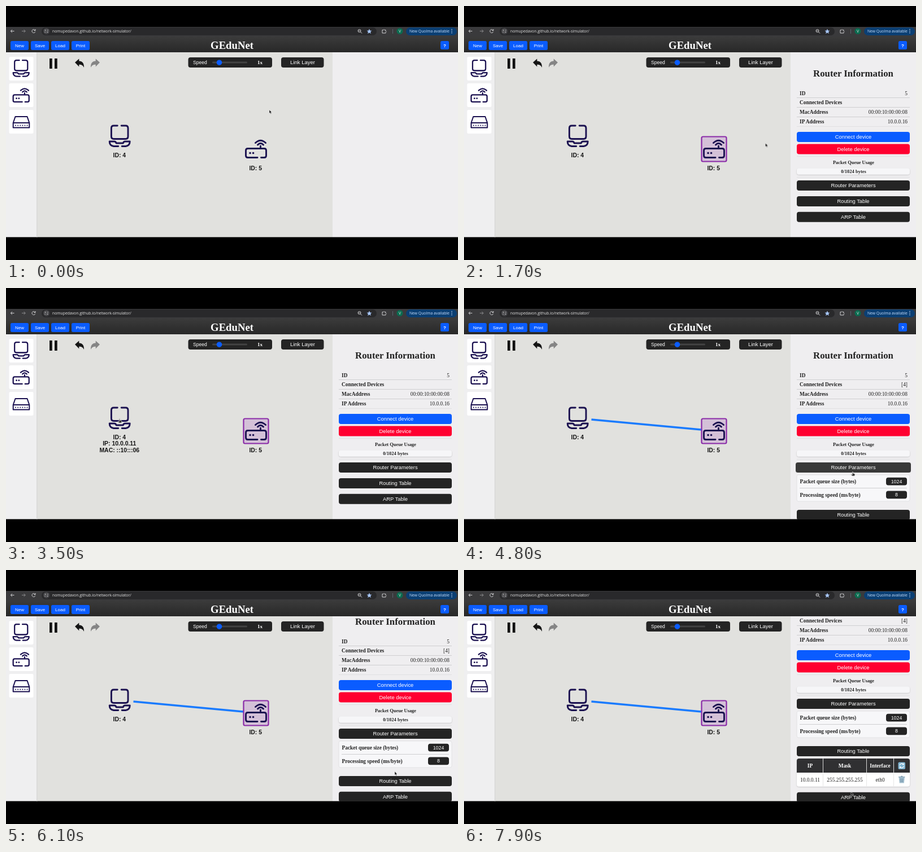
An HTML page that plays this animation: 800 px wide and 450 px high, repeating every 8000 ms.

```html
<!DOCTYPE html>
<html lang="en">
<head>
<meta charset="utf-8">
<title>Network simulator</title>
<style>
  html, body { margin: 0; width: 100%; height: 100%; overflow: hidden; background: #000; }
  svg { display: block; width: 800px; height: 450px; }
  text { font: 9.4px "Liberation Sans", Arial, sans-serif; fill: #fff; text-anchor: middle; }
  .ui { font: 6.8px "Open Sans", "Noto Sans", sans-serif; fill: #e3e3e3; text-anchor: start; }
  .small { font-size: 8px; }
  .serif { font-family: "Liberation Serif", serif; fill: #222; }
  .bold { font-weight: bold; }
  .start { text-anchor: start; }
  .end { text-anchor: end; }
  .white { fill: #fff; }
  .label text { font-size: 10.45px; font-weight: bold; fill: #151515; }
  .blue { fill: #0a5cff; }
  .dark { fill: #242424; }
  .red { fill: #ff0030; }
  .line { stroke: #cfcfd1; stroke-width: 1; }
  .icon { fill: none; stroke: #1b1150; stroke-width: 2.9; stroke-linecap: round; stroke-linejoin: round; }
  .tools { fill: none; stroke: #d0d0d2; stroke-width: 1; }

  .anim { animation: 8s infinite both; }
  .step { animation-timing-function: step-end; }
  .linear { animation-timing-function: linear; }
  .cursor { animation-name: cursor; animation-timing-function: ease-in-out; }
  .arrow { animation-name: arrow; }
  .hand { animation-name: hand; }
  .selected { animation-name: selected; }
  .linked { animation-name: linked; }
  .router-info { animation-name: router-info; }
  .host-info { animation-name: host-info; }
  .scroll { animation-name: scroll; }
  .params { animation-name: params; }
  .lower { animation-name: lower; }
  .routes { animation-name: routes; }
  .arp { animation-name: arp; }
  .connect { animation-name: connect; }
  .params-button { animation-name: params-button; }
  .routes-button { animation-name: routes-button; }

  @keyframes cursor {
    0%, 5% { transform: translate(466px, 184px); }
    12.5%, 16.25% { transform: translate(446px, 250px); }
    27.5%, 28.75% { transform: translate(661px, 233px); }
    38.75%, 47.5% { transform: translate(201px, 231px); }
    58.75%, 70% { transform: translate(688px, 325px); }
    80%, 93.75% { transform: translate(688px, 370px); }
    98.6%, 100% { transform: translate(685px, 393px); }
  }
  @keyframes hand {
    0% { opacity: 0; } 11.5% { opacity: 1; } 18% { opacity: 0; }
    23.2% { opacity: 1; } 31.2% { opacity: 0; } 33% { opacity: 1; } 34% { opacity: 0; }
    37.4% { opacity: 1; } 48.8% { opacity: 0; } 55.6% { opacity: 1; } 67% { opacity: 0; }
    77.6% { opacity: 1; } 88% { opacity: 0; } 100% { opacity: 0; }
  }
  @keyframes arrow {
    0% { opacity: 1; } 11.5% { opacity: 0; } 18% { opacity: 1; }
    23.2% { opacity: 0; } 31.2% { opacity: 1; } 33% { opacity: 0; } 34% { opacity: 1; }
    37.4% { opacity: 0; } 48.8% { opacity: 1; } 55.6% { opacity: 0; } 67% { opacity: 1; }
    77.6% { opacity: 0; } 88% { opacity: 1; } 100% { opacity: 1; }
  }
  @keyframes selected { 0% { opacity: 0; } 14.9%, 100% { opacity: 1; } }
  @keyframes linked { 0% { opacity: 0; } 46.1%, 100% { opacity: 1; } }
  @keyframes router-info {
    0% { opacity: 0; } 11.5% { opacity: 1; } 18% { opacity: 0; }
    33% { opacity: 1; } 34%, 100% { opacity: 0; }
  }
  @keyframes host-info { 0% { opacity: 0; } 37.4% { opacity: 1; } 48.8%, 100% { opacity: 0; } }
  @keyframes scroll {
    0%, 64.5% { transform: translateY(0); }
    68.75% { transform: translateY(-21px); animation-timing-function: ease-out; }
    71.2%, 86.5% { transform: translateY(-28px); animation-timing-function: ease-in-out; }
    91.2%, 100% { transform: translateY(-81px); }
  }
  @keyframes params { 0% { opacity: 0; } 59.9%, 100% { opacity: 1; } }
  @keyframes lower { 0% { transform: translateY(0); } 59.9%, 100% { transform: translateY(56px); } }
  @keyframes routes { 0% { opacity: 0; } 82.4%, 100% { opacity: 1; } }
  @keyframes arp { 0% { transform: translateY(0); } 82.4%, 100% { transform: translateY(54px); } }
  @keyframes connect {
    0%, 23.2% { transform: none; fill: #0a5cff; }
    25.2%, 31.2% { transform: scale(1.02); fill: #1a1a72; }
    33%, 100% { transform: none; fill: #0a5cff; }
  }
  @keyframes params-button {
    0%, 55.6% { transform: none; fill: #242424; }
    57.6%, 67.6% { transform: scale(1.02); fill: #393939; }
    70%, 100% { transform: none; fill: #242424; }
  }
  @keyframes routes-button {
    0%, 77.6% { transform: none; fill: #242424; }
    79.6%, 88% { transform: scale(1.02); fill: #393939; }
    90%, 100% { transform: none; fill: #242424; }
  }
</style>
</head>
<body>
<svg viewBox="0 0 800 450">
  <defs>
    <linearGradient id="header" x2="0" y2="1">
      <stop stop-color="#3b3b3b"/><stop offset="1" stop-color="#282828"/>
    </linearGradient>
    <clipPath id="page"><path d="M578 82H800V409.5H578Z"/></clipPath>
    <filter id="soft" x="-5%" y="-30%" width="110%" height="180%">
      <feDropShadow dx="0" dy="1" stdDeviation="1" flood-opacity=".18"/>
    </filter>
    <g id="laptop" class="icon">
      <path d="M15.5 1.5H9Q4.7 1.5 4.7 6V20.5Q4.7 25 9 25H30Q34.3 25 34.3 20.5V6Q34.3 1.5 30 1.5H22.5"/>
      <path d="M17 38H9Q1.5 37 1.5 29.5H10Q12.5 29.5 13.5 32.5H25.5Q26.5 29.5 29 29.5H37.5Q37.5 37 30 38H23.5"/>
    </g>
    <g id="router" class="icon">
      <path d="M22 32H5Q1.5 32 1.5 28.5V19.5Q1.5 16 5 16H34Q37.5 16 37.5 19.5V28.5Q37.5 32 34 32H28.5M27.5 15.5V11.5"/>
      <path d="M22.5 9.5Q27.5 4 32.5 9.5M18.5 6Q27.5-2.5 36.5 6"/>
      <path d="M9 24h.1M14.5 24h.1" stroke-width="3.6"/>
    </g>
  </defs>

  <!-- Browser bar -->
  <rect y="37" width="800" height="18" fill="#3a3a3c"/>
  <rect x="63" y="38" width="593" height="14" rx="7" fill="#29292b"/>
  <g class="tools">
    <path d="M14.5 44.5H8.5M11 41.8L8.3 44.5L11 47.2"/>
    <path d="M28 44.5H34M31.5 41.8L34.2 44.5L31.5 47.2" stroke="#8a8a8c"/>
    <path d="M51.5 43A3 3 0 1 0 51.8 45.5M52 41V43.5H49.5"/>
    <circle cx="71.5" cy="44.5" r="5.5" fill="#47474a" stroke="none"/>
    <path d="M68.5 43H71M73 43H74.5M68.5 46.2H70M72 46.2H74.5"/>
    <circle cx="625.5" cy="44" r="2.5"/>
    <path d="M627.5 46L630 48.5M624.3 44H626.7"/>
    <path d="M666 42.5H668Q669 40.5 670 42.5H672V44.5Q674 45.5 672 46.5V48H666Z"/>
    <path d="M684.5 41V49" stroke="#5a6470"/>
  </g>
  <path fill="#a8c7fa" d="M643 40.5l1.3 2.9 3.1.3-2.3 2.1.7 3.1-2.8-1.6-2.8 1.6.7-3.1-2.3-2.1 3.1-.3Z"/>
  <circle cx="697" cy="44.5" r="5.5" fill="#0b6b50"/>
  <text class="ui" x="695" y="47">V</text>
  <rect x="708" y="38" width="90" height="14" rx="7" fill="#0b3f73"/>
  <text class="ui" x="82" y="47">nomupedavon.github.io/network-simulator/</text>
  <text class="ui" x="714" y="47" style="fill:#c8e0ff">New Quolma available</text>
  <path d="M789 41.5v.1M789 44.5v.1M789 47.5v.1" stroke="#c8e0ff" stroke-width="1.6" stroke-linecap="round"/>

  <!-- Page -->
  <rect y="82" width="54" height="327.5" fill="#efeff0"/>
  <rect x="54" y="82" width="524" height="327.5" fill="#e1e1de"/>
  <rect x="54" y="82" width="1.5" height="327.5" fill="#d9d9d7"/>
  <rect x="578" y="82" width="222" height="327.5" fill="#efeef0"/>

  <g fill="#fff">
    <rect x="5.5" y="90" width="43" height="42" rx="2.5"/>
    <rect x="5.5" y="137" width="43" height="42" rx="2.5"/>
    <rect x="5.5" y="184" width="43" height="42" rx="2.5"/>
  </g>
  <use href="#laptop" transform="translate(11.5 95) scale(.78)"/>
  <use href="#router" transform="translate(11.5 145) scale(.78)"/>
  <g class="icon" style="stroke-width:2">
    <path d="M16.5 196H37.5L41.3 207V215.5H12.7V207ZM13 207H41"/>
    <path d="M17 211.5H38" stroke-dasharray=".1 4"/>
  </g>

  <!-- Canvas toolbar -->
  <path d="M77 93h4.7v18h-4.7zM86 93h4.7v18h-4.7z" fill="#111"/>
  <path id="undo" d="M122 100l7.3-6.5v4c6 0 9 4 8.7 11.5c-2-4-4.5-5.3-8.7-5.3v3.8z" fill="#151515"/>
  <path d="M166 100l-7.3-6.5v4c-6 0-9 4-8.7 11.5c2-4 4.5-5.3 8.7-5.3v3.8z" fill="#858585"/>
  <g class="dark">
    <rect x="322.5" y="91" width="148.5" height="18" rx="4"/>
    <rect x="487" y="91" width="75.5" height="18" rx="4"/>
  </g>
  <text class="start" x="331" y="103" style="font-size:8.6px">Speed</text>
  <rect x="365" y="98.5" width="62" height="3" rx="1.5" fill="#434343"/>
  <circle class="blue" cx="377.5" cy="100.2" r="4.8"/>
  <text class="serif bold white" x="449.5" y="103" style="font-size:9px">1x</text>
  <text x="525" y="103.3" style="font-size:9.5px">Link Layer</text>

  <!-- Network -->
  <path class="anim step linked" d="M225.5 233L420 251" stroke="#1a7bff" stroke-width="3.4"/>
  <rect class="anim step selected" x="420.5" y="231.5" width="44" height="44" rx="2.5" fill="#a040c0" fill-opacity=".2" stroke="#8a2ba8" stroke-width="2.2"/>
  <use href="#laptop" x="181.7" y="210.5"/>
  <use href="#router" x="423" y="236.5"/>
  <g class="label">
    <text x="200.8" y="268">ID: 4</text>
    <text x="441.7" y="291">ID: 5</text>
    <g class="anim step host-info">
      <text x="200.8" y="279.3">IP: 10.0.0.11</text>
      <text x="200.8" y="291">MAC: ::10:::06</text>
    </g>
    <g class="anim step router-info">
      <text x="441.7" y="302.3">IP: 10.0.0.16</text>
      <text x="441.7" y="314">MAC: ::10:::08</text>
    </g>
  </g>

  <!-- Device panel -->
  <g clip-path="url(#page)"><g class="anim step selected"><g class="anim linear scroll">
    <text class="serif bold" x="689" y="125" style="font-size:16.8px">Router Information</text>
    <text class="serif bold start" x="594" y="157.5">ID</text>
    <text class="serif bold start" x="594" y="174.4">Connected Devices</text>
    <text class="serif bold start" x="594" y="191.3">MacAddress</text>
    <text class="serif bold start" x="594" y="208.2">IP Address</text>
    <text class="serif end" x="785" y="157.5">5</text>
    <text class="serif end anim step linked" x="785" y="174.4">[4]</text>
    <text class="serif end" x="785" y="191.3">00:00:10:00:00:08</text>
    <text class="serif end" x="785" y="208.2">10.0.0.16</text>
    <path class="line" d="M589 162.5H789M589 179.5H789M589 196.5H789"/>
    <path class="line" d="M589 213.5H789M589 266.5H789M589 303.5H789" opacity=".45"/>
    <g transform="translate(689 232)">
      <rect class="anim linear connect" x="-100" y="-9" width="200" height="18" rx="4"/>
      <text y="3.2">Connect device</text>
    </g>
    <g transform="translate(689 253.6)">
      <rect class="red" x="-100" y="-9" width="200" height="18" rx="4"/>
      <text y="3.2">Delete device</text>
    </g>
    <text class="serif bold" x="689.5" y="279.6" style="font-size:8.4px">Packet Queue Usage</text>
    <rect x="589" y="287.5" width="200" height="11" rx="4" fill="#f6f6f8" filter="url(#soft)"/>
    <text class="serif bold" x="689.5" y="295.8" style="font-size:8.5px">0/1024 bytes</text>
    <g transform="translate(689 318)">
      <rect class="anim linear params-button" x="-100" y="-9" width="200" height="18" rx="4"/>
      <text y="3.2">Router Parameters</text>
    </g>
    <g class="anim step params">
      <rect x="589" y="331" width="200" height="47" rx="3" fill="#f7f7f9" stroke="#e2e2e4"/>
      <path class="line" d="M594 354.5H784"/>
      <text class="serif bold start" x="594.5" y="345.8">Packet queue size (bytes)</text>
      <text class="serif bold start" x="594.5" y="369.6">Processing speed (ms/byte)</text>
      <g class="dark">
        <rect x="747" y="335.8" width="37" height="13.7" rx="4"/>
        <rect x="747" y="359.5" width="37" height="13.7" rx="4"/>
      </g>
      <text x="765.5" y="345.5" style="font-size:8.8px">1024</text>
      <text x="765.5" y="369.3" style="font-size:8.8px">8</text>
    </g>
    <g class="anim step lower">
      <g class="anim step routes">
        <rect x="589" y="359" width="200" height="49.5" rx="4" fill="#fff" filter="url(#soft)"/>
        <path d="M589 384V363q0-4 4-4H785q4 0 4 4V384Z" fill="#303032"/>
        <path d="M635.5 359V384M712.5 359V384M760.5 359V384" stroke="#d8d8d8"/>
        <path d="M635.5 384V408M712.5 384V408M760.5 384V408" stroke="#e6e6e6"/>
        <text class="serif bold white" style="fill:#fff" x="612.5" y="374.6">IP</text>
        <text class="serif bold white" style="fill:#fff" x="674" y="374.6">Mask</text>
        <text class="serif bold white" style="fill:#fff" x="736.5" y="374.6">Interface</text>
        <text class="serif" x="612.5" y="399.6">10.0.0.11</text>
        <text class="serif" x="674" y="399.6">255.255.255.255</text>
        <text class="serif" x="736.5" y="399.6">eth0</text>
        <rect x="768.5" y="365.5" width="12.5" height="12.5" rx="2" fill="#7fb3d0"/>
        <path d="M771 371A4 4 0 0 1 778 369.5V367.5M778 369.7H775.8M778.5 372.5A4 4 0 0 1 771.5 374V376M771.5 373.8H773.7" fill="none" stroke="#fff" stroke-width="1.2"/>
        <path d="M769.5 392H780L778.8 402.5H770.7Z" fill="#a9c3d2"/>
        <path d="M769 391.7H780.5M773 390.3H776.5M772.5 394L773 401M774.8 394V401M777 394L776.5 401" fill="none" stroke="#6f92a8"/>
      </g>
      <g transform="translate(689 346)">
        <rect class="anim linear routes-button" x="-100" y="-9" width="200" height="18" rx="4"/>
        <text y="3.2">Routing Table</text>
      </g>
      <g class="anim step arp"><g transform="translate(689 373.8)">
        <rect class="dark" x="-100" y="-9" width="200" height="18" rx="4"/>
        <text y="3.2">ARP Table</text>
      </g></g>
    </g>
  </g></g></g>

  <!-- Header -->
  <rect y="54" width="800" height="28" fill="url(#header)"/>
  <g class="blue">
    <rect x="8" y="62" width="32" height="16" rx="2.5"/>
    <rect x="44" y="62" width="32" height="16" rx="2.5"/>
    <rect x="80" y="62" width="32" height="16" rx="2.5"/>
    <rect x="116" y="62" width="32" height="16" rx="2.5"/>
    <rect x="769" y="62" width="15" height="15" rx="2.5"/>
  </g>
  <text class="small" x="24" y="72.5">New</text>
  <text class="small" x="60" y="72.5">Save</text>
  <text class="small" x="96" y="72.5">Load</text>
  <text class="small" x="132" y="72.5">Print</text>
  <text class="small bold" x="776.5" y="72.5">?</text>
  <text class="serif bold" x="400" y="76" style="fill:#fff;font-size:18.7px">GEduNet</text>

  <!-- Pointer -->
  <g class="anim cursor" stroke-linejoin="round">
    <path class="anim step arrow" d="M0 0V6.2L1.5 5L2.5 7.2L3.6 6.7L2.6 4.6H4.5Z" fill="#111" stroke="#eee" stroke-width=".5"/>
    <path class="anim step hand" d="M-.7 1Q0 0 .7 1V3.5Q4 3.5 4 5.2L3.3 8H-1L-3 5.3Q-2.5 4.5-.7 5.7Z" fill="#333" stroke="#ddd" stroke-width=".7"/>
  </g>
</svg>
</body>
</html>
```
